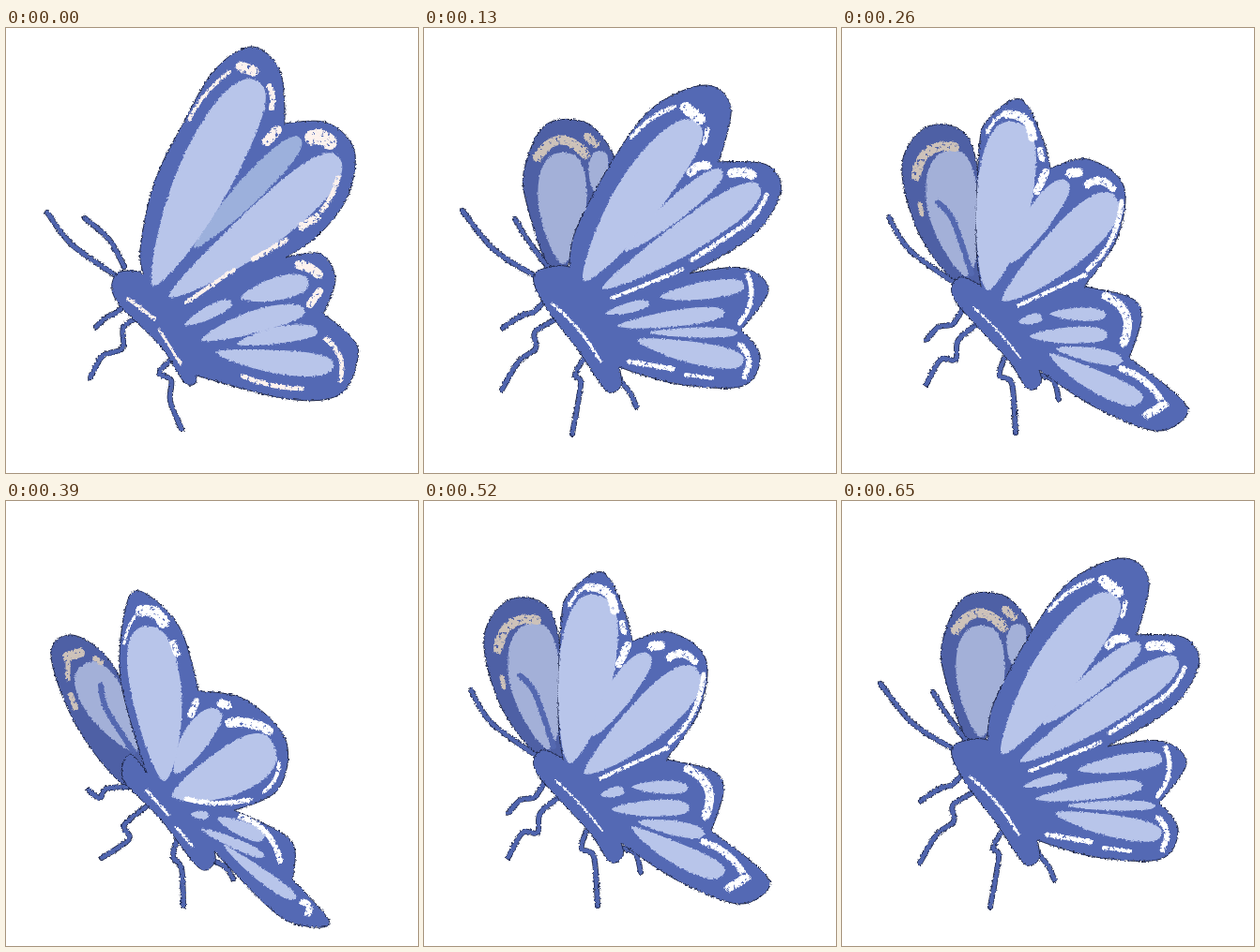
Write an HTML page that moves like this. It is 439x475 px and loops after 780 ms.

```html
<!DOCTYPE html>
<html lang="en">
<head>
<meta charset="utf-8">
<title>Butterfly</title>
<style>
  html, body { margin: 0; width: 100%; height: 100%; overflow: hidden; background: #fff; }
  svg { display: block; width: 100%; height: 100%; }
  path { stroke-linecap: round; stroke-linejoin: round; }
</style>
</head>
<body>
<svg id="stage" viewBox="0 0 439 475">
  <defs>
    <filter id="rough" filterUnits="userSpaceOnUse" x="0" y="0" width="439" height="475" color-interpolation-filters="sRGB">
      <feTurbulence type="fractalNoise" baseFrequency=".4" numOctaves="2" seed="4"/>
      <feDisplacementMap in="SourceGraphic" scale="3.5" xChannelSelector="R" yChannelSelector="G"/>
    </filter>
    <filter id="chalk" filterUnits="userSpaceOnUse" x="0" y="0" width="439" height="475" color-interpolation-filters="sRGB">
      <feTurbulence type="fractalNoise" baseFrequency=".3" numOctaves="2" seed="9"/>
      <feColorMatrix values="0 0 0 0 0  0 0 0 0 0  0 0 0 0 0  8 0 0 0 -2.1"/>
      <feComposite in="SourceGraphic" operator="in"/>
    </filter>
  </defs>
</svg>
<script>
// Outlines are smooth curves through key points (* = sharp corner).
// Petals and marks: x0, y0, x1, y1, width, sideways bend.
const poses = [{
  legs: ['44,197 70,231 118,265', '84,203 110,226 126,255', '128,295 117,304 107,309 96,319',
    '140,309 125,320 124,342 103,350 90,373', '178,352 163,368 176,376 175,398 187,428'],
  wing: `146,262 143,235 158,165 188,103 222,45 262,20 292,46 297,102* 342,101 371,130 364,180 333,221
    298,245* 335,241 351,268 338,305* 368,330 375,352 356,391 300,396 203,371* 201,380 189,377 165,340
    117,290 118,262 143,260*`,
  mid: [[200,235,313,117,28]],
  light: [[157,275,266,56,60,-3], [174,287,354,137,48,6], [250,288,322,270,25], [208,333,318,301,24,-3],
    [246,337,332,323,18,-2], [224,346,349,360,26,3], [190,317,240,292,14]],
  blush: [[195,98,238,47,4,-4], [250,41,264,46,11], [281,62,283,85,6,-2], [278,121,289,109,10],
    [326,117,345,122,16,-3], [354,160,336,196,5,-2], [331,202,315,212,8], [299,226,263,247,5],
    [243,258,192,293,4], [312,253,333,263,10,-2], [334,281,324,295,8], [341,332,356,376,5,-8],
    [253,372,315,385,5,3], [130,289,158,310,4], [163,322,186,358,3]]
}, {
  legs: ['41,195 75,237 119,265', '97,204 111,227 131,254', '126,294 117,303 104,307 84,320',
    '138,312 118,325 119,342 101,356 83,386', '172,350 161,370 167,380 158,433', '208,375 220,390 226,404'],
  back: '133,255 110,190 107,150 130,103 175,102 203,138 200,160 155,250',
  dim: [[148,252,147,133,52], [182,175,188,131,20]],
  sand: [[121,138,172,135,10,-17], [174,116,183,124,8]],
  wing: `155,255* 162,215 203,138 245,84 300,61 327,85 314,143* 365,146 380,175 350,222 283,262*
    340,256 367,280 338,322* 358,350 340,382 270,380 208,362* 210,382 194,387 165,345 128,296 117,264 140,254`,
  light: [[170,270,290,100,52,-4], [214,238,317,152,24], [190,278,357,168,36,3], [251,287,341,274,19],
    [206,318,320,303,18], [240,325,334,325,11], [227,333,341,355,24,2], [193,305,240,293,11]],
  white: [[221,117,267,84,4,-4], [279,85,294,97,12], [302,108,299,122,5], [284,154,302,147,9,-3],
    [328,155,350,157,10,-2], [365,178,340,212,5,-3], [336,214,285,248,5], [275,258,201,288,4],
    [345,263,336,315,5,-8], [337,338,341,372,6,-7], [219,356,265,364,5], [279,370,307,374,4],
    [136,294,188,356,3,-4]]
}, {
  legs: ['50,202 72,237 120,272', '130,297 118,316 103,319 90,333', '147,314 124,333 121,354 105,354 90,380',
    '173,352 168,371 181,380 185,432', '208,370 225,376 231,396'],
  back: '118,268 80,215 64,145 92,105 135,118 150,200 150,270',
  dim: [[133,265,113,131,56,-3]],
  vein: '102,186 118,205 138,262',
  sand: [[79,158,120,127,10,-13], [83,188,85,199,5]],
  wing: `148,275* 143,230 146,130 155,98 190,76 214,118 222,150* 262,140 300,168 293,225 258,276*
    308,288 319,310 306,352* 355,390 368,412 335,430 270,405 210,365* 212,379 198,385 175,352 120,290 125,266`,
  light: [[155,280,182,100,60,3], [179,251,239,163,28,-2], [171,291,290,179,46,4], [222,305,281,306,14],
    [200,329,283,327,18], [228,342,299,355,16], [221,348,320,397,24,4], [188,314,213,308,11]],
  white: [[155,112,175,90,4,-3], [175,92,203,117,9,-9], [211,130,213,140,6], [208,174,217,154,8],
    [243,155,252,154,10], [261,167,288,171,8,-6], [298,185,262,258,5,-8], [260,263,188,296,4],
    [281,286,300,336,9,-13], [298,364,343,402,7,-6], [343,402,325,413,9], [140,298,190,352,2,-2]]
}, {
  legs: ['132,305 107,307 100,317 88,309', '150,326 126,346 131,361 102,381',
    '182,362 178,380 187,392 189,432', '218,383 233,390 242,403'],
  back: '125,303 75,240 48,165 70,143 110,170 145,240 150,290',
  dim: [[139,268,82,175,46]],
  vein: '101,197 107,222 136,268',
  sand: [[65,166,79,162,10], [66,172,66,190,5], [69,207,74,221,6], [95,168,101,172,6]],
  wing: `150,290* 122,190 128,112 145,97 185,135 205,203* 255,212 298,255 290,308 243,330* 295,355
    308,374 305,404* 345,450 310,452 278,432 222,374* 222,387 205,391 165,340 125,297 132,270`,
  light: [[169,299,147,134,54,4], [180,291,226,223,29,-3], [177,315,284,258,52,6], [197,334,216,336,9],
    [225,338,275,360,16], [208,350,275,379,11], [232,367,309,424,14,2]],
  white: [[126,152,138,122,3,-2], [144,117,168,130,12,-5], [178,152,182,163,7], [197,228,203,214,7],
    [229,216,236,218,9], [238,237,280,245,10,-4], [291,280,275,310,4,-4], [192,318,260,319,5,4],
    [250,337,292,384,6,-9], [316,428,322,440,7,-4], [150,309,173,335,3], [181,348,198,368,3]]
}];

const colors = {
  wing: '#5469b4', leg: '#5065ae', back: '#4e60a5', vein: '#5468b0', ink: '#1c2444',
  light: '#b8c5ea', mid: '#9cb0dc', dim: '#a3b0d8',
  white: '#fff', blush: '#fdf2ee', sand: '#cdc2b9'
};
const order = [0, 1, 2, 3, 2, 1];
const stage = document.getElementById('stage');

function add(parent, tag, attrs) {
  const el = document.createElementNS('http://www.w3.org/2000/svg', tag);
  for (const key in attrs) el.setAttribute(key, attrs[key]);
  return parent.appendChild(el);
}

// Catmull-Rom spline written as cubic Béziers
function spline(text, closed) {
  const pts = text.split(/\s+/).map(s => ({ p: s.replace('*', '').split(',').map(Number), sharp: s.endsWith('*') }));
  const n = pts.length;
  const at = i => pts[closed ? (i + n) % n : Math.max(0, Math.min(n - 1, i))];
  const handle = (i, dir) => at(i).p.map((v, k) =>
    at(i).sharp ? v : v + dir * (at(i + 1).p[k] - at(i - 1).p[k]) / 6);
  let d = 'M' + at(0).p;
  for (let i = 0; i < n - !closed; i++) d += `C${handle(i, 1)} ${handle(i + 1, -1)} ${at(i + 1).p}`;
  return d;
}

// Teardrop from a narrow root to a round tip
function petal([x0, y0, x1, y1, width, bend = 0]) {
  const dx = x1 - x0, dy = y1 - y0, len = Math.hypot(dx, dy);
  const at = (t, side) => {
    const off = (side * width / 2 + bend * 4 * t * (1 - t)) / len;
    return [x0 + dx * t - dy * off, y0 + dy * t + dx * off];
  };
  return `M${at(0, 0)}C${at(0, .3)} ${at(.3, 1)} ${at(.62, 1)}S${at(1, .6)} ${at(1, 0)}` +
    `C${at(1, -.6)} ${at(.88, -1)} ${at(.62, -1)}S${at(0, -.3)} ${at(0, 0)}Z`;
}

function arc([x0, y0, x1, y1, , bend = 0]) {
  const dx = x1 - x0, dy = y1 - y0, k = 2 * bend / Math.hypot(dx, dy);
  return `M${x0},${y0}Q${(x0 + x1) / 2 - dy * k},${(y0 + y1) / 2 + dx * k} ${x1},${y1}`;
}

function drawPose(pose) {
  const group = add(stage, 'g', { filter: 'url(#rough)' });
  const line = (parent, d, color, width) =>
    add(parent, 'path', { d, fill: 'none', stroke: colors[color], 'stroke-width': width });
  const outline = kind => pose[kind] && add(group, 'path',
    { d: spline(pose[kind], true), fill: colors[kind], stroke: colors.ink, 'stroke-width': 1 });
  const petals = kind => (pose[kind] || []).forEach(p => add(group, 'path', { d: petal(p), fill: colors[kind] }));
  const marks = kind => {
    const layer = add(group, 'g', { filter: 'url(#chalk)' });
    (pose[kind] || []).forEach(m => line(layer, arc(m), kind, m[4]));
  };

  outline('back');
  petals('dim');
  if (pose.vein) line(group, spline(pose.vein), 'vein', 6);
  marks('sand');
  for (const leg of pose.legs) {
    line(group, spline(leg), 'ink', 6);
    line(group, spline(leg), 'leg', 4.5);
  }
  outline('wing');
  petals('mid');
  petals('light');
  marks('blush');
  marks('white');
  return group;
}

const groups = poses.map(drawPose);

function tick() {
  const now = order[Math.floor(performance.now() / 130) % order.length];
  groups.forEach((g, i) => g.style.display = i === now ? '' : 'none');
  requestAnimationFrame(tick);
}
tick();
</script>
</body>
</html>
```
